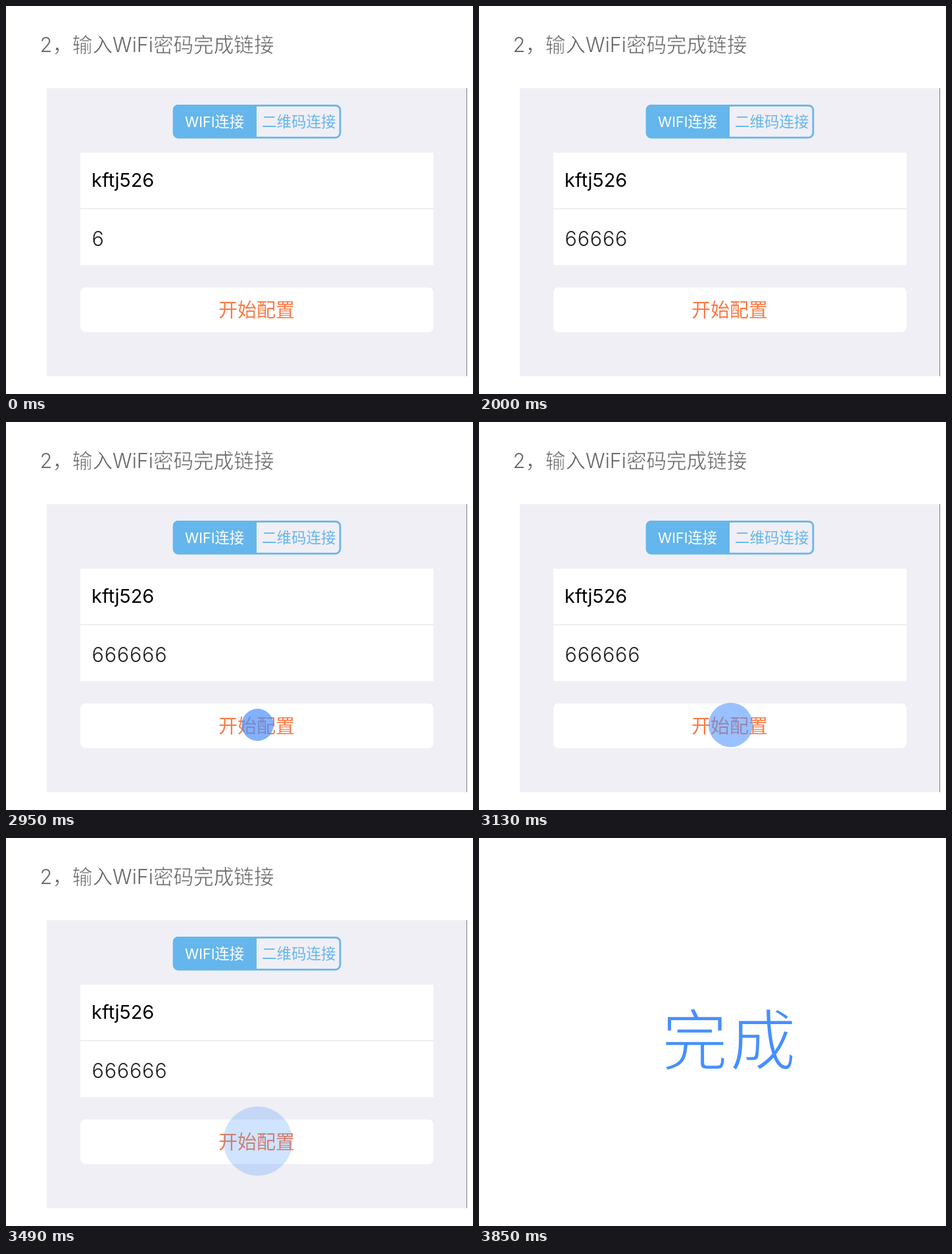
Recreate the animation shown at these times as an HTML page. Size 710 by 590 pixels, loop 5.82 s.

```html
<!DOCTYPE html>
<html lang="zh-CN">
<head>
<meta charset="utf-8">
<title>WiFi</title>
<style>
  html, body { margin: 0; width: 100%; height: 100%; overflow: hidden; background: #fff; }
  svg { display: block; width: 100%; height: 100%; }
  text { font-family: Inter, "Noto Sans CJK SC", "Noto Sans CJK", sans-serif; }
  .light { font-weight: 300; }
  /* a background-coloured outline slims the regular weight */
  .slim { stroke: #fff; stroke-width: .65px; }
  .done { stroke: #fff; stroke-width: 2.6px; letter-spacing: 2.5px; }

  .typed, .form, .tap, .done { animation: 5820ms linear infinite; }
  .typed { animation-name: typing; }
  .form { animation-name: leave; }
  .tap { animation-name: tap; }
  .done { animation-name: enter; }

  /* one more digit every 500 ms */
  @keyframes typing {
    0% { width: 0; animation-timing-function: steps(6, start); }
    51.546%, 100% { width: 114px; }
  }
  /* two growth phases of 20 steps, 30 ms each */
  @keyframes tap {
    0% { r: 0; opacity: 1; cx: 382.5px; cy: 460.5px; animation-timing-function: step-end; }
    42.955% { r: 0; opacity: 1; cx: 382.5px; cy: 460.5px; animation-timing-function: steps(20, start); }
    53.264% { r: 30.5px; opacity: .6; cx: 382.5px; cy: 460.5px; animation-timing-function: steps(20, start); }
    63.573%, 100% { r: 62px; opacity: .1; cx: 383px; cy: 461px; }
  }
  /* cross-fade in 6 steps of 30 ms */
  @keyframes leave {
    0%, 63.573% { opacity: 1; animation-timing-function: steps(6, start); }
    66.666%, 100% { opacity: 0; }
  }
  @keyframes enter {
    0%, 63.573% { opacity: 0; animation-timing-function: steps(6, start); }
    66.666%, 100% { opacity: 1; }
  }
</style>
</head>
<body>
<svg viewBox="0 0 710 590">
  <clipPath id="typed"><rect class="typed" x="130.5" y="335" height="40"/></clipPath>

  <g class="form">
    <text class="light" x="51.5" y="70" font-size="30.6" fill="#666">2<tspan class="slim">，输入</tspan>WiFi<tspan class="slim">密码完成链接</tspan></text>

    <rect x="62" y="125" width="638" height="438" fill="#f0eff5"/>
    <rect x="700" y="125" width="1" height="438" fill="#7c7c7e"/>

    <rect x="255" y="151.25" width="253" height="48.75" rx="7" fill="none" stroke="#65b6ec" stroke-width="2.75"/>
    <path d="M381 150H262a8 8 0 0 0-8 8v35a8 8 0 0 0 8 8h119z" fill="#65b6ec"/>
    <text x="272" y="183.5" font-size="22.4" fill="#fff"><tspan font-size="21.5">WIFI</tspan>连接</text>
    <text x="389" y="183.5" font-size="22.5" fill="#65b6ec">二维码连接</text>

    <rect x="113" y="223" width="537" height="171" fill="#fff"/>
    <rect x="113" y="307.5" width="537" height="1.5" fill="#e9e9ec"/>
    <text x="130" y="275" font-size="29" fill="#000">kftj526</text>
    <text class="light" x="130.5" y="364.5" font-size="30.5" letter-spacing=".8" fill="#222" clip-path="url(#typed)">666666</text>

    <rect x="113" y="428" width="537" height="68" rx="8" fill="#fff"/>
    <text x="323" y="473" font-size="29" fill="#fb7a45">开始配置</text>
    <circle class="tap" fill="#468fff"/>
  </g>

  <text class="done" x="277.5" y="344.5" font-size="101" fill="#468fff">完成</text>
</svg>
</body>
</html>
```
